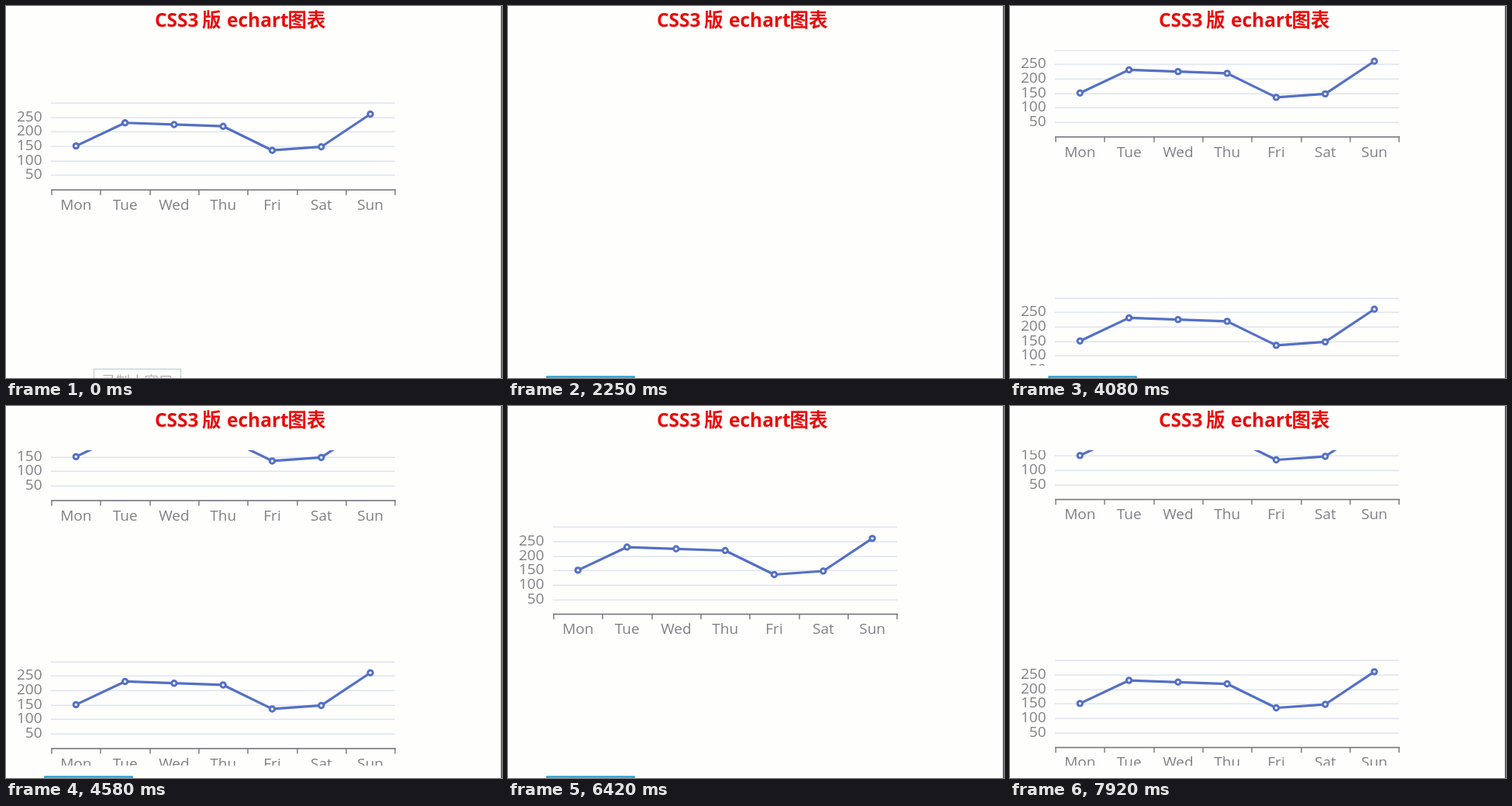
Recreate the animation shown at these times as an HTML page with a canvas. Size 640 by 480 pixels, loop 8 s.

```html
<!DOCTYPE html>
<html lang="zh">
<head>
<meta charset="utf-8">
<title>CSS3版 echart图表</title>
<style>
html, body { margin: 0; width: 100%; height: 100%; overflow: hidden; background: #fefefc; }
canvas { display: block; }
</style>
</head>
<body>
<canvas id="stage" width="640" height="480"></canvas>
<script>
const ctx = document.getElementById('stage').getContext('2d');
const LOOP = 8000, STEP = 1000 / 12;
const FONT = '"Open Sans", "Noto Sans CJK SC", "Noto Sans CJK", sans-serif';
const PAPER = '#fefefc', GRID = '#e0e5f1', AXIS = '#74767c', LABEL = '#808186', LINE = '#5470c6';
const DAYS = ['Mon', 'Tue', 'Wed', 'Thu', 'Fri', 'Sat', 'Sun'];
const VALUES = [150, 230, 224, 218, 135, 147, 260];
const LEFT = 59, SLOT = 63.3, HEIGHT = 112, PITCH = 320;

// Axis height of a chart over time: end of one pass, then the next pass.
const LAST_PASS = [[0, 237], [2250, 20]];
const NEXT_PASS = [[3170, 258], [3500, 226], [3830, 192.5], [4580, 122], [4750, 108],
  [5580, 25], [6420, -52], [7250, -135], [7920, -200]];

function track(points, t) {
  let i = 1;
  while (i < points.length - 1 && t > points[i][0]) i++;
  const [t0, a] = points[i - 1], [t1, b] = points[i];
  return a + (b - a) * (t - t0) / (t1 - t0);
}

function text(str, x, y, size, color, align = 'left', weight = 400) {
  ctx.font = `${weight} ${size}px ${FONT}`;
  ctx.fillStyle = color;
  ctx.textAlign = align;
  ctx.fillText(str, x, y);
}

function bar(x, y, w, h, color) {
  ctx.fillStyle = color;
  ctx.fillRect(x, y, w, h);
}

function chart(axis) {
  const yOf = v => axis - HEIGHT * v / 300;
  for (let v = 50; v <= 300; v += 50) {
    bar(58, Math.round(yOf(v)) - .5, 444, 1.6, GRID);
    if (v < 300) text(v, 46.5, yOf(v) + 5, 19, LABEL, 'right');
  }
  bar(58, axis - .5, 445, 1.6, AXIS);
  for (let i = 0; i <= 7; i++) bar(Math.round(LEFT + SLOT * i) - .7, axis, 1.4, 7, AXIS);

  const points = VALUES.map((v, i) => [90.3 + SLOT * i, yOf(v) - .4]);
  ctx.strokeStyle = LINE;
  ctx.lineJoin = 'round';
  ctx.lineWidth = 3.2;
  ctx.beginPath();
  points.forEach(p => ctx.lineTo(...p));
  ctx.stroke();
  ctx.lineWidth = 3;
  ctx.fillStyle = '#fff';
  for (const [x, y] of points) {
    ctx.beginPath();
    ctx.arc(x, y, 3.2, 0, 7);
    ctx.fill();
    ctx.stroke();
  }
  DAYS.forEach((day, i) => text(day, 90.3 + SLOT * i, axis + 26, 19, LABEL, 'center'));
}

function button(t) {
  if (t > 6900) return;
  const p = Math.min(1, t / 2250);
  const x = 113 - 63 * p, y = 468 + 10 * p;
  const mix = (a, b) => Math.round(a + (b - a) * p);
  bar(x, y, 113, 20, PAPER);
  ctx.strokeStyle = `rgb(${mix(200, 40)},${mix(212, 160)},${mix(214, 208)})`;
  ctx.lineWidth = 1.5 + p;
  ctx.strokeRect(x + .5, y + .5, 112, 30);
  text('录制小窗口', x + 10, y + 23, 18.5, '#b4b5b4');
}

// The picture advances in even steps, with a few longer holds.
function heldTime(t) {
  let k = Math.floor(t / STEP + .06);
  if (k === 1) k = 0;
  if (k > 27 && k < 38) k = 27;
  if (k === 47) k = 46;
  return k * STEP;
}

function draw(now) {
  const t = heldTime(now % LOOP);
  bar(0, 0, 640, 480, PAPER);
  const title = (str, x) => text(str, x, 27, 24.5, '#e90d0b', 'left', 700);
  title('CSS3', 192);
  title('版', 253);
  title('echart', 285);
  title('图表', 363.5);

  ctx.save();
  ctx.beginPath();
  ctx.rect(0, 57, 640, 407);
  ctx.clip();
  if (t < 2240) chart(track(LAST_PASS, t));
  else if (t > 3100) {
    const axis = track(NEXT_PASS, t);
    for (let i = 0; i < 3; i++) chart(axis + PITCH * i);
  }
  ctx.restore();

  button(t);
  bar(638.7, 0, 1.3, 480, '#3a3a3a');
}

let start;
function tick(now) {
  start ??= now;
  draw(now - start);
  requestAnimationFrame(tick);
}
requestAnimationFrame(tick);
</script>
</body>
</html>
```
